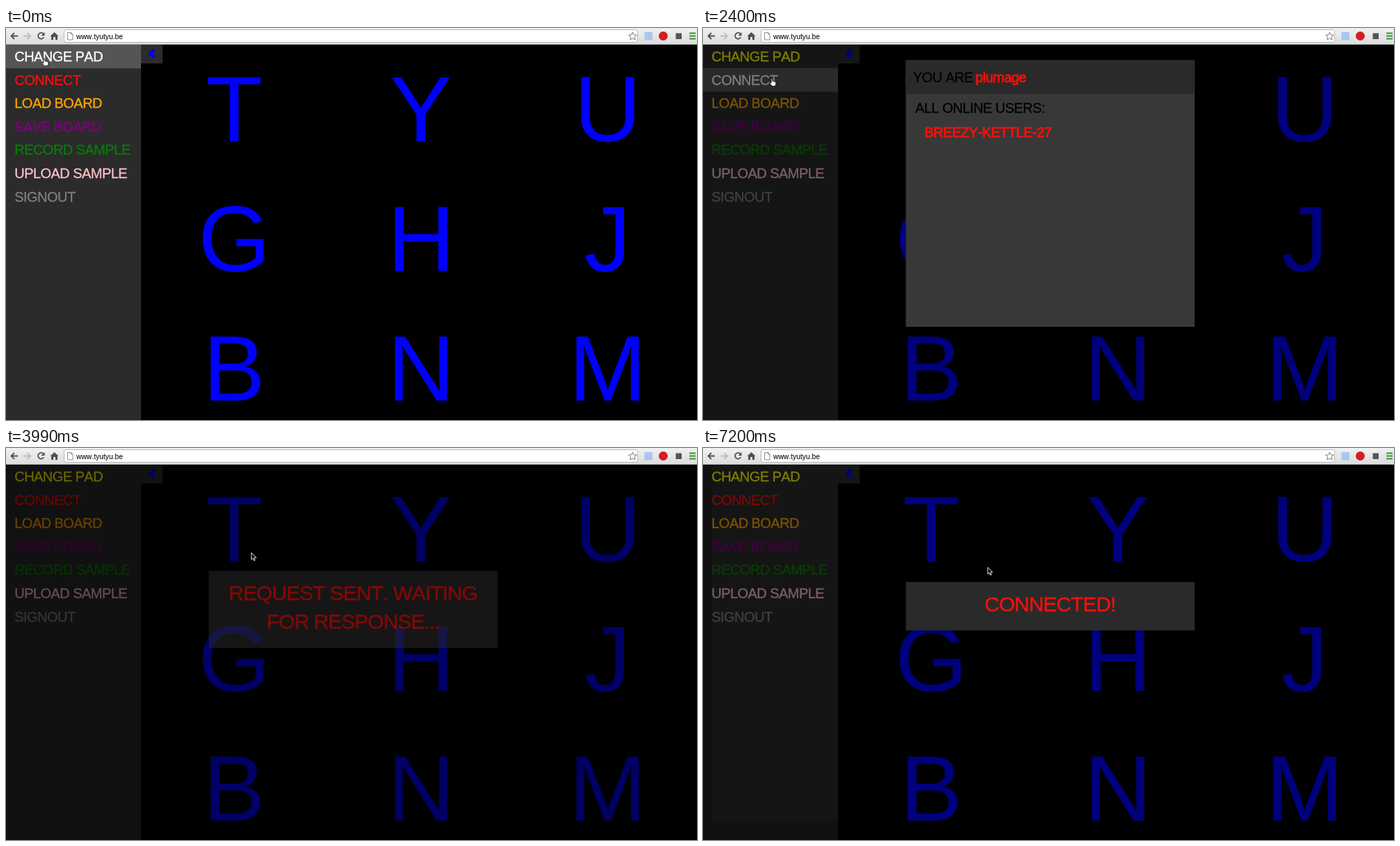
Write an HTML page that moves like this. It is 993 by 564 pixels and loops after 8 s.

```html
<!DOCTYPE html>
<html lang="en">
<head>
<meta charset="utf-8">
<title>Pad board</title>
<style>
  html, body { margin: 0; width: 100%; height: 100%; overflow: hidden; background: #000; }
  svg { display: block; width: 993px; height: 564px; }
  text {
    font: 20px "Liberation Sans", Arial, sans-serif;
    font-kerning: none;
    letter-spacing: -.55px;
    fill: currentColor;
    stroke: currentColor;
    stroke-width: .3px;
    white-space: pre;
  }
  #pads text { font-size: 134px; letter-spacing: 0; stroke: none; text-anchor: middle; color: #00f; }
  #notice text { font-size: 30px; letter-spacing: -1px; text-anchor: middle; color: #fc0f0a; }
  #bar text { font-size: 10.3px; letter-spacing: 0; color: #111; stroke-width: .1px; }
  .red { color: #fc0f0a; }
  .strong { stroke-width: .8px; }
</style>
</head>
<body>
<svg viewBox="0 0 993 564">
  <defs>
    <linearGradient id="chrome" x2="0" y2="1">
      <stop stop-color="#f1f1f1"/><stop offset="1" stop-color="#dcdcdc"/>
    </linearGradient>
  </defs>
  <rect width="993" height="564"/>
  <g id="pads"></g>
  <path fill="#2b2b2b" d="M0 24H225V51H194V564H0Z"/>
  <path id="edge" fill="#000" opacity=".2" d="M0 24H13V536H194V564H0Z"/>
  <path fill="#00f" d="M204 37l7.3-7 3.6 3.2-4 3.8 4 3.8-3.6 3.2z"/>
  <rect id="hover" width="194" height="34" fill="#555"/>
  <g id="menu"></g>
  <rect id="dim" y="24" width="993" height="540"/>

  <g id="users">
    <rect x="291.5" y="46" width="415" height="384" fill="#383838"/>
    <rect x="291.5" y="46" width="415" height="49" fill="#2a2a2a"/>
    <rect id="row" x="291.5" y="136" width="415" height="28" fill="#808080"/>
    <text x="301.8" y="77.5">YOU ARE</text>
    <text x="391.5" y="77.5" class="red strong">plumage</text>
    <text x="305" y="122.3">ALL ONLINE USERS:</text>
    <text id="user" x="318.2" y="157" class="red">BREEZY-KETTLE-27</text>
  </g>

  <g id="notice">
    <rect id="box" x="291.5" y="193" width="415" fill="#2a2a2a"/>
    <g id="waiting">
      <text x="498.7" y="235">REQUEST SENT. WAITING</text>
      <text x="498.7" y="276.8">FOR RESPONSE...</text>
    </g>
    <text id="connected" x="498.7" y="235">CONNECTED!</text>
  </g>

  <g id="bar">
    <rect width="993" height="24" fill="url(#chrome)"/>
    <rect y="23" width="993" height="1" fill="#b0b0b0"/>
    <rect x="83.5" y="2.5" width="824" height="18" rx="2.5" fill="#fff" stroke="#b8b8b8"/>
    <g fill="none" stroke="#505050" stroke-width="1.8">
      <path d="M17 11.5H8M12 7L7.5 11.5 12 16"/>
      <path stroke="#bdbdbd" d="M25 11.5H34.500M30.500 7L35 11.5 30.500 16"/>
      <path d="M53.800 8.600A4.300 4.300 0 1 0 54.300 13"/>
      <path stroke-width="1" stroke="#888" d="M88.500 6.500H93.500L96 9V17H88.500ZM93.500 6.500V9H96"/>
      <path stroke-width="1" stroke="#777" d="M900.500 6l1.700 3.800 4.100.4-3.100 2.700.9 4.100-3.600-2.100-3.600 2.100.9-4.100-3.100-2.700 4.100-.4z"/>
      <path stroke="#2f9a2f" stroke-width="2" d="M982 7.500H991M982 11.500H991M982 15.500H991"/>
    </g>
    <path fill="#505050" d="M55.500 6V11H50.500ZM69.500 6L75.500 11.800H74V17H71V13H68V17H65V11.800H63.500Z"/>
    <rect x="917.500" y="6" width="11.500" height="11.500" fill="#a9c7ec"/>
    <circle cx="944.500" cy="11.500" r="6.500" fill="#d21f1f"/>
    <rect x="962.500" y="7.500" width="8.500" height="8.500" fill="#555"/>
    <text x="101" y="15.500">www.tyutyu.be</text>
  </g>

  <g id="cursor">
    <path id="hand" fill="#fff" stroke="#000" stroke-width=".7"
      d="M3 7V1.200Q3.900.2 4.800 1.200V4.600L9 5.400Q10 5.800 9.900 7L9 11.500H4.200L.8 7.600Q.6 6.300 1.800 6.600L3 7.800Z"/>
    <path id="arrow" fill="#000" stroke="#fff" stroke-width=".9"
      d="M.7.7V10.500L2.900 8.500 4.500 12 6 11.300 4.500 7.800H7.700Z"/>
  </g>
</svg>
<script>
const LOOP = 8000;
const $ = id => document.getElementById(id);
const set = (id, attrs) => {
  for (const name in attrs) $(id).setAttribute(name, attrs[name]);
};
const show = (id, on) => set(id, { visibility: on ? 'visible' : 'hidden' });

function addText(parent, content, x, y, color) {
  const el = document.createElementNS('http://www.w3.org/2000/svg', 'text');
  el.textContent = content;
  el.setAttribute('x', x);
  el.setAttribute('y', y);
  if (color) el.style.color = color;
  $(parent).append(el);
  return el;
}

['TYU', 'GHJ', 'BNM'].forEach((keys, row) =>
  [...keys].forEach((key, col) =>
    addText('pads', key, 328 + 268.3 * col, 163.2 + 186.3 * row)));

const menu = [
  ['CHANGE PAD', '#ff0'], ['CONNECT', '#fc0f0a'], ['LOAD BOARD', '#ffa500'],
  ['SAVE BOARD', '#800080'], ['RECORD SAMPLE', '#008000'],
  ['UPLOAD SAMPLE', '#ffc0cb'], ['SIGNOUT', '#808080'],
].map(([label, color], i) =>
  ({ color, el: addText('menu', label, 12.3, 48 + 33.6 * i, color) }));

// Each step holds only what changes; dialogs are [opacity, vertical offset].
const steps = [
  [0, { at: [51, 43], arrow: false, hot: 0, dim: 0, users: [0, 0], row: false,
        notice: [0, 0], edge: false, waiting: 1, connected: false }],
  [600, { at: [55, 44] }],
  [860, { at: [80, 67], hot: 1 }],
  [1010, { at: [82, 68] }],
  [1150, { at: [90, 71] }],
  [1300, { at: [95, 72] }],
  [1750, { dim: .12 }],
  [1890, { dim: .31 }],
  [2130, { dim: .48, users: [.4, -22] }],
  [2400, { dim: .5, users: [1, 0] }],
  [2660, { at: [273, 104], arrow: true, hot: -1 }],
  [2810, { at: [283, 108] }],
  [2960, { at: [298, 113] }],
  [3110, { at: [338, 141] }],
  [3250, { at: [348, 151], arrow: false, row: true }],
  [3400, { at: [350, 151] }],
  [3840, { at: [352, 150], arrow: true, dim: .57, users: [.4, -40], row: false }],
  [3990, { dim: .6, users: [0, 0], notice: [.53, -16.3] }],
  [4290, { dim: .5, notice: [1, 0], edge: true }],
  [4560, { at: [396, 167] }],
  [4800, { at: [408.5, 171] }],
  [6900, { waiting: .5 }],
  [7200, { waiting: 0, connected: true }],
];

function placeDialog(id, [opacity, y]) {
  set(id, { opacity, transform: `translate(0 ${y})` });
}

function draw(time) {
  const s = Object.assign({}, ...steps.filter(([t]) => t <= time).map(([, change]) => change));
  menu.forEach(({ el, color }, i) => { el.style.color = i === s.hot ? '#fff' : color; });
  set('hover', { y: 24 + 33.6 * s.hot });
  show('hover', s.hot >= 0);
  set('dim', { opacity: s.dim });
  show('edge', s.edge);
  placeDialog('users', s.users);
  show('row', s.row);
  $('user').classList.toggle('strong', !s.row);
  placeDialog('notice', s.notice);
  set('box', { height: s.connected ? 69.5 : 111 });
  set('waiting', { opacity: s.waiting });
  show('connected', s.connected);
  set('cursor', { transform: `translate(${s.at})` });
  show('arrow', s.arrow);
  show('hand', !s.arrow);
}

const start = performance.now();
function tick() {
  draw((performance.now() - start) % LOOP);
  requestAnimationFrame(tick);
}
tick();
</script>
</body>
</html>
```
